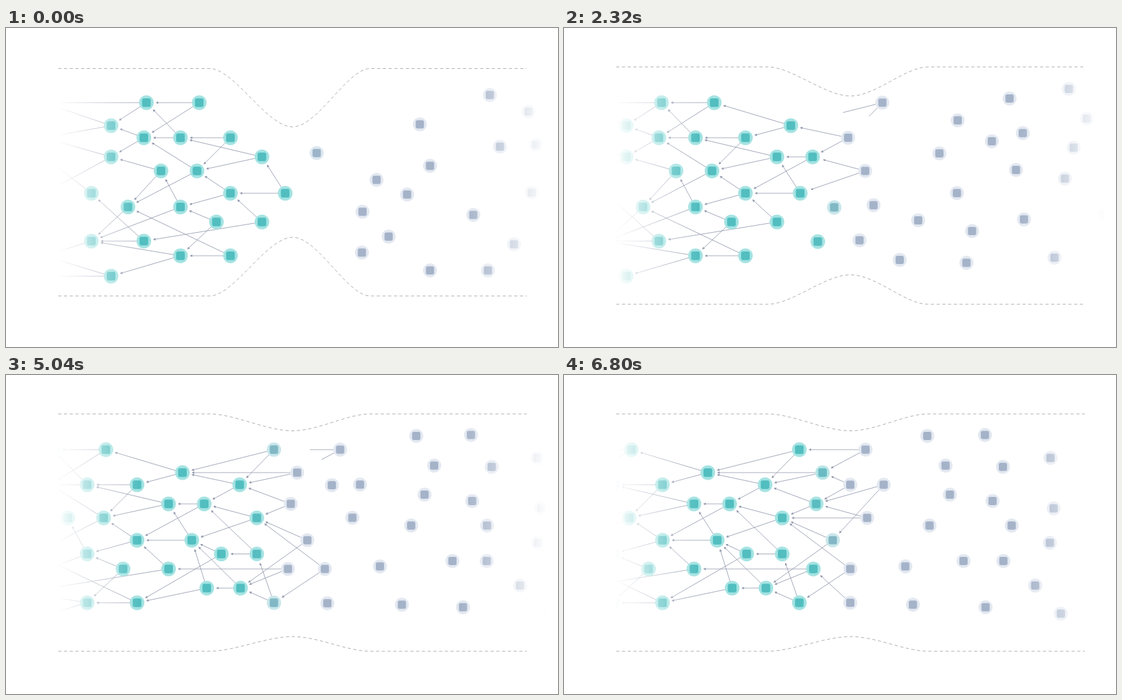
Recreate the animation shown at these times as an HTML page with a canvas. Size 867 by 500 pixels, loop 6.84 s.

```html
<!DOCTYPE html>
<html lang="en">
<head>
<meta charset="utf-8">
<title>Node flow</title>
<style>
  html, body { margin: 0; width: 100%; height: 100%; overflow: hidden; background: #fff; }
  canvas { display: block; width: 867px; height: 500px; }
</style>
</head>
<body>
<canvas id="stage" width="867" height="500"></canvas>
<script>
const ctx = document.getElementById('stage').getContext('2d');
const LOOP = 6840, STEP = 40, SCROLL = 0.0291;
const GREY = { halo: [228, 233, 241], core: [165, 179, 201] };
const TEAL = { halo: [164, 227, 226], core: [82, 190, 192] };

// Graph layout: row name, y, then x of each node
const rows = {
  m: [117, 60, 220.5, 303.5, 567.5, 671.5],
  n: [153, 165, 423.8, 604],
  o: [172, 60, 216.5, 274, 352.5, 513.7, 647.5, 700],
  p: [202, 60, 165, 402, 458, 594],
  q: [224, 243.5, 300, 540.6, 674],
  r: [259, 60, 134, 352.5, 438.5, 620],
  s: [280.5, 191.5, 274, 484.8, 540.6],
  t: [304, 330.5, 402, 589.5, 647.5],
  u: [334, 134, 216.5, 462, 515],
  v: [357, 60, 274, 352.5, 567.5, 647.5],
  w: [389, 60, 165]
};

// Start points of late nodes, in order of arrival
const starts = {
  n1: [488, 196], p3: [582, 238], o4: [650, 151], q2: [666, 216], m3: [760, 105],
  u2: [559, 352], s2: [560, 288], s3: [630, 261], u3: [601, 327], t2: [734, 293],
  v3: [666, 380], r4: [826, 258], p4: [776, 186], n2: [821, 131], t3: [798, 339],
  m4: [894, 102], o6: [894, 156], v4: [757, 380], o5: [833, 183], q3: [875, 221]
};

// Nodes that never join, in order of slowing down
const loose = [
  [734, 300], [804, 187.5], [901, 236], [860, 364], [871, 197.5], [772, 236],
  [888, 291.5], [938, 330], [859, 94], [962, 130], [967, 209], [961, 263],
  [797, 142], [887, 144], [825, 291.5], [745.5, 360], [978, 374], [768, 95.5]
];

const links = (
  'm1>m0,n0 m2>m1,o1 n0>m0,o0 o1>n0,p1 o2>m1,o1 o3>o2,q1 p1>o0,r0 p2>o2,q1 ' +
  'q0>p1,s0 q1>o1,s0 r1>p0 r2>q1,s1 r3>p2,r2 s0>u0 s1>q0,u0 t0>s1,v1 t1>r2,u1 ' +
  'u0>v0 u1>r1,u0 v1>u0,w1 v2>v1,s0 w1>w0,v0 n1>m2,o3 p3>p2,r2 u2>r3,v2 ' +
  's2>r3,v2 o4>n1,p3 u3>r3,u2 q2>p3,r3 s3>p3,s2 v3>s3,u3 m3>n1,o4 t2>t1,u3 ' +
  'p4>o4,q2 n2>n1,o4 r4>q2,u3 v4>t2 t3>q2,v3 o5>n2,p4 m4>m3,n2 o6>p4,r4 q3>p4,q2'
).split(' ').flatMap(item => {
  const [from, targets] = item.split('>');
  return targets.split(',').map(to => [from, to]);
});

const nodes = {};
for (const [row, [y, ...xs]] of Object.entries(rows)) {
  xs.forEach((x, i) => {
    nodes[row + i] = { home: [x, y], start: [x, y], settle: -1000, power: 1 };
  });
}
Object.entries(starts).forEach(([name, start], i) => {
  Object.assign(nodes[name], { start, settle: 1350 + 245 * i, power: 1.36 });
});
loose.forEach(([x, y], i) => {
  const settle = 4500 + 2450 * (1 - Math.pow(1 - i / (loose.length - 1), 3));
  nodes['loose' + i] = { home: [x, y], start: [x + 175, y], settle, power: 1.57 };
});

const clamp = v => Math.max(0, Math.min(1, v));
const left = (t, end, power) => Math.pow(clamp(1 - t / end), power);
const lerp = (a, b, k) => a + (b - a) * k;
const mix = (a, b, k) => `rgb(${a.map((v, i) => Math.round(lerp(v, b[i], k)))})`;

function place({ home, start, settle, power }, t) {
  const k = left(t, settle, power);
  return [lerp(home[0], start[0], k) - SCROLL * t, lerp(home[1], start[1], k)];
}

function drawLink([ax, ay], [bx, by], grow) {
  if (grow <= 0) return;
  const dx = bx - ax, dy = by - ay;
  const tip = (Math.hypot(dx, dy) - 14.5) * grow;
  const head = 4 * grow * grow;
  ctx.save();
  ctx.translate(ax, ay);
  ctx.rotate(Math.atan2(dy, dx));
  ctx.beginPath();
  ctx.moveTo(0, 0);
  ctx.lineTo(tip - head / 2, 0);
  ctx.stroke();
  ctx.beginPath();
  ctx.moveTo(tip, 0);
  ctx.lineTo(tip - head, -head / 2);
  ctx.lineTo(tip - head, head / 2);
  ctx.fill();
  ctx.restore();
}

function drawNode([x, y], tint) {
  ctx.fillStyle = mix(GREY.halo, TEAL.halo, tint);
  ctx.beginPath();
  ctx.arc(x, y, 11 + 0.5 * tint, 0, Math.PI * 2);
  ctx.fill();
  const size = 13 + 0.6 * tint;
  ctx.fillStyle = mix(GREY.core, TEAL.core, tint);
  ctx.beginPath();
  ctx.roundRect(x - size / 2, y - size / 2, size, size, 3);
  ctx.fill();
}

// White veil from x0 (opaque) to x1 (clear), covering the side beyond x0
function drawVeil(x0, x1, power) {
  const veil = ctx.createLinearGradient(x0, 0, x1, 0);
  for (let k = 0; k <= 1; k += 0.125) {
    veil.addColorStop(k, `rgba(255,255,255,${Math.pow(1 - k, power)})`);
  }
  ctx.fillStyle = veil;
  if (x0 < x1) ctx.fillRect(0, 0, x1, 500);
  else ctx.fillRect(x1, 0, 867 - x1, 500);
}

function drawWall(flat, neck) {
  ctx.beginPath();
  ctx.moveTo(82, flat);
  ctx.lineTo(320, flat);
  ctx.bezierCurveTo(358, flat, 410, neck, 450, neck);
  ctx.bezierCurveTo(490, neck, 536, flat, 572, flat);
  ctx.lineTo(818, flat);
  ctx.stroke();
}

function draw(t) {
  const squeeze = left(t, 4300, 1.63), settle = left(t, 2320, 1.4);
  const front = 417 + 50 * squeeze * squeeze;
  const at = {};
  for (const name in nodes) at[name] = place(nodes[name], t);

  ctx.fillStyle = '#fff';
  ctx.fillRect(0, 0, 867, 500);
  ctx.strokeStyle = ctx.fillStyle = '#9299ad';
  ctx.lineWidth = 0.8;
  for (const [from, to] of links) {
    drawLink(at[from], at[to], clamp((t - nodes[from].settle + 250) / 500));
  }
  for (const name in at) {
    drawNode(at[name], clamp((front - at[name][0]) / 52 + 0.5));
  }
  drawVeil(80, 210, 1.25);
  drawVeil(850, 715, 1.2);

  ctx.strokeStyle = '#adadad';
  ctx.lineWidth = 1;
  ctx.setLineDash([5, 4]);
  drawWall(61 + 2.5 * settle, 87.5 + 67.5 * squeeze);
  drawWall(433 - 13 * settle, 410 - 82 * squeeze);
  ctx.setLineDash([]);
}

function tick() {
  const t = performance.now() % LOOP;
  draw(Math.floor(t / STEP) * STEP);
  requestAnimationFrame(tick);
}
tick();
</script>
</body>
</html>
```
